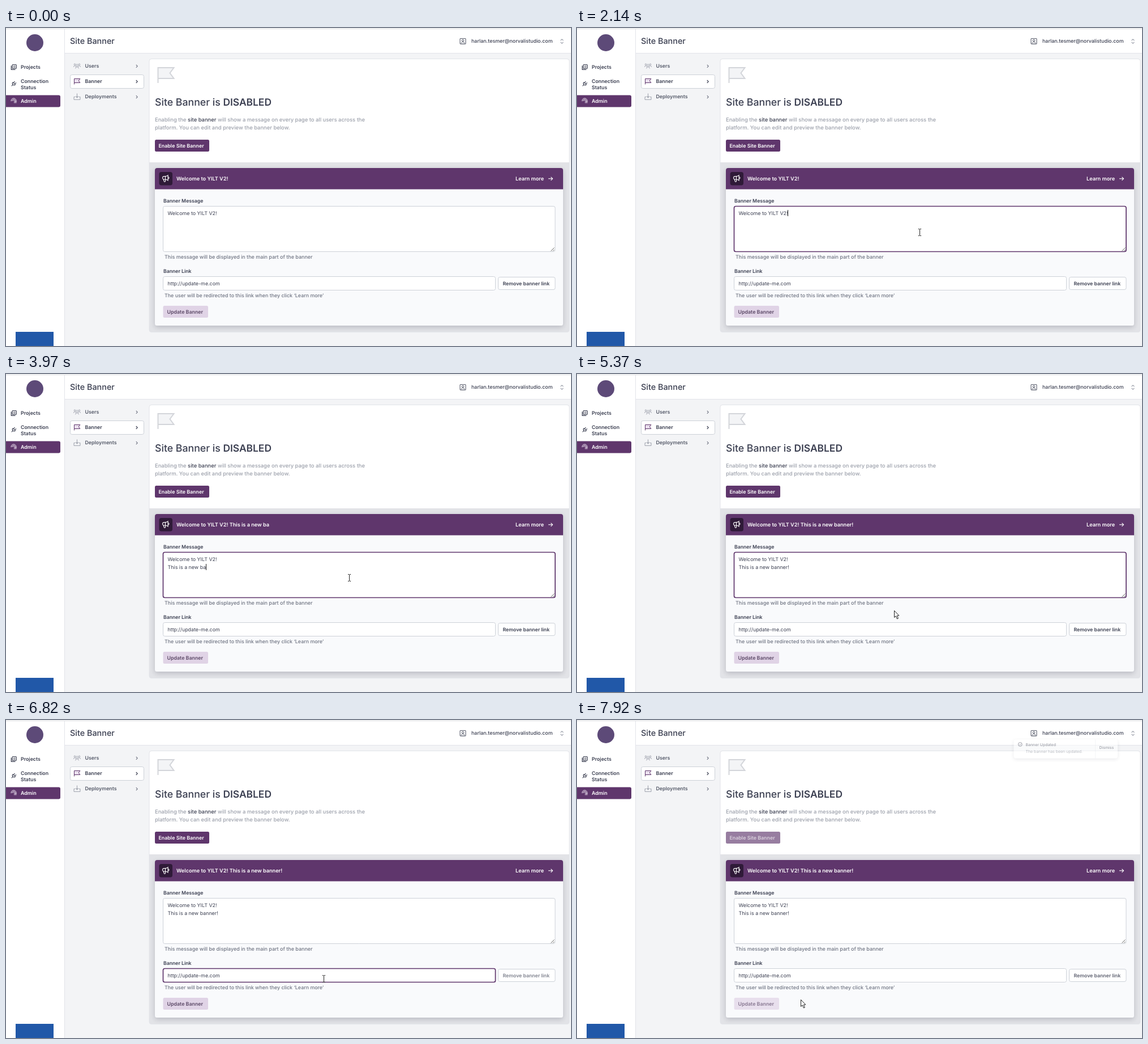
Animation, 998 px wide and 561 px high, one loop 7.99 s. Source, as an HTML page with a canvas:

```html
<!DOCTYPE html>
<html lang="en">
<head>
<meta charset="utf-8">
<title>Site Banner</title>
<style>
html, body { margin: 0; width: 100%; height: 100%; overflow: hidden; background: #f3f4f6; }
canvas { display: block; width: 998px; height: 561px; }
</style>
</head>
<body>
<canvas id="stage"></canvas>
<script>
const W = 998, H = 561, LOOP = 7990, BLINK = 530;
const canvas = document.getElementById('stage');
const ctx = canvas.getContext('2d');
const dpr = window.devicePixelRatio || 1;
canvas.width = W * dpr;
canvas.height = H * dpr;

const PURPLE = '#5f366c', INK = '#3b3f51', GREY = '#9ca0ab', MUTED = '#6f7482',
      BORDER = '#cdd1d8', RULE = '#e2e4e9';
const HELLO = 'Welcome to YILT V2!';
const LINK = 'http://update-me.com';
const NEWLINE = 2270, FOCUS_TEXT = 1080, FOCUS_LINK = 6290, BLUR = 7640, SAVED = 7780;

const BURSTS = [
  { start: 2530, pace: 105, str: 'This is' },
  { start: 3360, pace: 68, str: ' a new ' },
  { start: 3900, pace: 68, str: 'banner' },
  { start: 4580, pace: 68, str: '!' }
];

// The pointer eases from stop to stop.
const STOPS = [
  { t: 120, x: 893, y: 527 },
  { t: 940, x: 605, y: 360 },
  { t: 5110, x: 606, y: 359 },
  { t: 5370, x: 560, y: 417 },
  { t: 6200, x: 561, y: 456 },
  { t: 6820, x: 561, y: 456 },
  { t: 7570, x: 332, y: 500 },
  { t: 7920, x: 395, y: 493 }
];

const MEGAPHONE = new Path2D('M11 5.9V19.2a1.8 1.8 0 0 1-3.4.6l-2.2-6.1M18 13a3 3 0 1 0 0-6' +
  'M5.4 13.7A4 4 0 0 1 7 6h1.8c4.1 0 7.6-1.2 9.2-3v14c-1.6-1.8-5.1-3-9.2-3H7a4 4 0 0 1-1.6-.3z');

const clamp = v => Math.max(0, Math.min(1, v));
const ramp = (t, start, length) => clamp((t - start) / length);
const smooth = k => k * k * (3 - 2 * k);

function font(size, weight) {
  ctx.font = `${weight} ${size}px Inter, "Open Sans", sans-serif`;
}

// Returns the right end so that runs can be chained.
function text(str, x, y, color = INK, weight = 500, size = 8.8) {
  font(size, weight);
  ctx.fillStyle = color;
  ctx.fillText(str, x, y);
  return x + ctx.measureText(str).width;
}

function paint(fill, stroke, width = 1) {
  if (fill) { ctx.fillStyle = fill; ctx.fill(); }
  if (stroke) { ctx.strokeStyle = stroke; ctx.lineWidth = width; ctx.stroke(); }
}

function box(x, y, w, h, radius, fill, stroke, width) {
  ctx.beginPath();
  ctx.roundRect(x, y, w, h, radius);
  paint(fill, stroke, width);
}

function line(points, color, width, close = false, fill) {
  ctx.beginPath();
  points.forEach(([x, y]) => ctx.lineTo(x, y));
  if (close) ctx.closePath();
  paint(fill, color, width);
}

function arc(x, y, r, color, width, from = 0, to = 2, fill) {
  ctx.beginPath();
  ctx.arc(x, y, r, from * Math.PI, to * Math.PI);
  paint(fill, color, width);
}

function at(x, y, draw, scale = 1, turn = 0) {
  ctx.save();
  ctx.translate(x, y);
  ctx.rotate(turn * Math.PI);
  ctx.scale(scale, scale);
  draw();
  ctx.restore();
}

function faded(alpha, draw) {
  ctx.save();
  ctx.globalAlpha *= alpha;
  draw();
  ctx.restore();
}

// A panel whose shadow falls only outside its own edge.
function raised(x, y, w, h, fill, alpha, blur, dy) {
  ctx.save();
  ctx.beginPath();
  ctx.rect(0, 0, W, H);
  ctx.roundRect(x, y, w, h, 4);
  ctx.clip('evenodd');
  ctx.shadowColor = `rgba(30, 30, 50, ${alpha})`;
  ctx.shadowBlur = blur * dpr;
  ctx.shadowOffsetY = dy * dpr;
  box(x, y, w, h, 4, fill);
  ctx.restore();
  box(x, y, w, h, 4, fill);
}

function flag(x, y, k, color, width, fill) {
  at(x, y, () => line([[0, 27], [0, 0], [28, 0], [21, 9.5], [28, 19], [0, 19]],
    color, width / k, false, fill), k);
}

function chevron(x, y, color, turn = 0) {
  at(x, y, () => line([[-1.2, -2.5], [1.2, 0], [-1.2, 2.5]], color, 1.1), 1, turn);
}

function sidebar() {
  box(0, 2, 103, H, 0, '#fff');
  box(103, 2, 1, H, 0, RULE);
  arc(51, 26, 15, null, 0, 0, 2, '#5d4a78');

  box(11.2, 64.5, 7, 7, 1, null, INK, 1.2);
  line([[9.3, 66.5], [9.3, 73.4], [16.5, 73.4]], INK, 1.2);
  [67, 69.3].forEach(y => line([[13, y], [16.5, y]], INK));
  text('Projects', 26, 72, INK, 600);

  at(13.7, 98.5, () => {
    arc(0, -1, 3, INK, 1.1, 0, 1);
    line([[-3, -1], [3, -1]], INK, 1.1);
    [-1.6, 1.6].forEach(x => line([[x, -1], [x, -4.5]], INK, 1.1));
    line([[0, 2], [0, 5.5]], INK, 1.1);
  }, 1, 0.25);
  text('Connection', 26, 97, INK, 600);
  text('Status', 26, 108, INK, 600);

  box(0, 118.5, 96, 21, [0, 3, 3, 0], PURPLE);
  for (let r = 1.4; r < 5; r += 1.6) {
    arc(13.5, 128.5, r, '#e6dbea', 0.9, 0.95, 2.1);
    line([[13.5 + r, 128.5], [13.3 + r, 132.5]], '#e6dbea', 0.9);
  }
  text('Admin', 26, 132, '#fff', 600, 8.9);

  box(17, 536, 67, 67, 0, '#2158a8');
}

function header() {
  box(104, 2, W - 104, 42, 0, '#fff');
  box(104, 44, W - 104, 1, 0, RULE);
  box(0, 1, W, 1, 0, '#dcdde0');
  text('Site Banner', 113, 28, INK, 500, 14.4);
  box(802, 18.5, 10, 9.6, 1, null, '#5b5f6e', 1.1);
  arc(807, 22, 1.7, '#5b5f6e');
  arc(807, 28, 3.3, '#5b5f6e', 1, 1.1, 1.9);
  text('harlan.tesmer@norvalistudio.com', 822, 26, INK, 500, 8.9);
  chevron(982, 21, GREY, -0.5);
  chevron(982, 26, GREY, 0.5);
}

function person(x, y, k) {
  arc(x, y - 3 * k, 1.7 * k, GREY, 0.9);
  arc(x, y + 3 * k, 2.8 * k, GREY, 0.9, 1, 2);
}

function subnav() {
  box(113.5, 82.5, 130, 24, 3, '#fff', BORDER);
  ['Users', 'Banner', 'Deployments'].forEach((label, i) => {
    const y = 67 + i * 27.2, active = i === 1;
    text(label, 139.5, Math.round(y + 2.6), active ? INK : '#555a69', 600);
    chevron(231, y + 0.3, active ? INK : MUTED);
  });

  person(125.5, 68.5, 1);
  person(121.5, 66.5, 0.75);
  person(129.5, 66.5, 0.75);
  flag(120.5, 89.5, 0.37, PURPLE, 1, '#eadfee');
  line([[122, 121.5], [120, 121.5], [120, 126.3], [131, 126.3], [131, 121.5], [129, 121.5]], GREY);
  line([[125.5, 115.5], [125.5, 122.5]], GREY);
  chevron(125.5, 121.5, GREY, 0.5);
}

function intro(saving) {
  box(253, 54.5, 742, 482, 4, '#e2e3e7', RULE);
  box(253.5, 55, 741, 182, [4, 4, 0, 0], '#fff');
  flag(268.5, 70, 1, '#d3d5da', 2, '#f3f4f6');
  const x = text('Site Banner is ', 263, 137, INK, 500, 17.7);
  text('DISABLED', x, 137, INK, 600, 17.4);

  const a = text('Enabling the ', 263, 165, GREY, 500, 9.42);
  const b = text('site banner', a, 165, INK, 500, 9.42);
  text(' will show a message on every page to all users across the', b, 165, GREY, 500, 9.42);
  text('platform. You can edit and preview the banner below.', 263, 179, GREY, 500, 9.42);

  faded(1 - 0.5 * saving, () => {
    box(263, 197, 96, 21, 2.5, PURPLE);
    text('Enable Site Banner', 269.5, 210.5, '#fff', 600, 8.85);
  });
}

function preview(message) {
  raised(263, 247, 721, 278, '#f9fafc', 0.2, 8, 3);
  box(263, 247, 721, 37.5, [4, 4, 0, 0], PURPLE);
  box(270.5, 254, 23.5, 23.5, 4, '#2f1a38');
  at(274.5, 258, () => {
    ctx.strokeStyle = '#fff';
    ctx.lineWidth = 1.7;
    ctx.stroke(MEGAPHONE);
  }, 0.64);
  text(message, 301, 269, '#fff', 600, 9.15);
  text('Learn more', 900, 269, '#fff', 600, 9.15);
  line([[958, 265.8], [965.5, 265.8]], '#fff', 1.1);
  line([[962.5, 262.8], [965.5, 265.8], [962.5, 268.8]], '#fff', 1.1);
}

function field(x, y, w, h, focus) {
  box(x, y, w, h, 3, '#fff', BORDER);
  if (focus > 0) faded(focus, () => box(x, y, w, h, 3, null, PURPLE, 1.7));
}

function caret(str, y) {
  font(8.9, 400);
  box(Math.round(285.5 + ctx.measureText(str).width), y, 1, 11, 0, '#222');
}

function form(t, typed, pointer, saving) {
  text('Banner Message', 278, 308, INK, 600, 8.7);
  field(277.5, 314.5, 692.5, 80, ramp(t, FOCUS_TEXT, 200) - ramp(t, FOCUS_LINK, 200));
  text(HELLO, 285.5, 330, INK, 400, 8.9);
  text(typed, 285.5, 344, INK, 400, 8.9);
  [6, 2.5].forEach(d => line([[968.5 - d, 393.5], [968.5, 393.5 - d]], '#555', 0.9));
  text('This message will be displayed in the main part of the banner', 280, 407, MUTED, 500, 8.96);

  text('Banner Link', 278, 432, INK, 600, 8.7);
  field(277.5, 438.5, 587, 24, ramp(t, FOCUS_LINK, 200) - ramp(t, BLUR, 150));
  text(LINK, 285.5, 453.5, INK, 400, 8.9);
  text('The user will be redirected to this link when they click ‘Learn more’', 280, 475, MUTED, 500, 8.86);

  const checking = ramp(t, 6690, 100) - ramp(t, 6870, 120);
  box(869.5, 439.5, 100.5, 22, 3, '#fff', BORDER);
  faded(1 - 0.35 * checking - 0.25 * saving, () =>
    text('Remove banner link', 877.5, 453.5, INK, 600, 8.7));

  faded(1 - 0.45 * saving, () => {
    box(277.5, 490, 79.5, 21, 2.5, pointer.hand ? '#d6c5dd' : '#e0d3e6');
    text('Update Banner', 284.5, 503.5, '#5b4866', 600, 8.85);
  });
}

function typing(t) {
  let typed = '', lastKey = NEWLINE;
  for (const { start, pace, str } of BURSTS) {
    if (t < start) break;
    const count = Math.min(str.length, 1 + Math.floor((t - start) / pace));
    typed += str.slice(0, count);
    lastKey = start + (count - 1) * pace;
  }
  return { typed, lastKey };
}

function drawCaret(t, typed, lastKey) {
  if (t < FOCUS_TEXT || t >= BLUR) return;
  const since = t < NEWLINE ? FOCUS_TEXT : t < FOCUS_LINK ? lastKey : FOCUS_LINK;
  if (Math.floor((t - since) / BLINK) % 2) return;
  if (t < NEWLINE) caret(HELLO, 321);
  else if (t < FOCUS_LINK) caret(typed, 335);
  else caret(LINK, 445);
}

function toast(t) {
  faded(ramp(t, SAVED, 300), () => {
    raised(771.5, 34.5, 183.5, 33, '#fff', 0.2, 6, 2);
    arc(782.8, 43, 3.4, INK, 1);
    line([[781.2, 43], [782.5, 44.3], [784.6, 41.8]], INK, 0.9);
    text('Banner Updated', 792.5, 46, INK, 500, 6.9);
    text('The banner has been updated.', 792.5, 57.5, MUTED, 400, 6.95);
    box(915, 34.5, 0.8, 33, 0, RULE);
    text('Dismiss', 922.5, 51.3, INK, 500, 6.9);
  });
}

function pointerAt(t) {
  const i = STOPS.findLastIndex(s => s.t <= t);
  if (i < 0) return { x: -50, y: -50 };
  const a = STOPS[i], b = STOPS[i + 1] || { ...a, t: LOOP };
  const k = smooth(ramp(t, a.t, b.t - a.t));
  const x = a.x + (b.x - a.x) * k, y = a.y + (b.y - a.y) * k;
  const over = (l, top, r, bottom) => x > l && x < r && y > top && y < bottom;
  return {
    x, y,
    beam: over(277, 314, 970, 395) || over(277, 438, 865, 463),
    hand: over(277, 490, 357, 511)
  };
}

function drawPointer({ x, y, beam, hand }) {
  at(Math.round(x), Math.round(y), () => {
    if (beam) {
      line([[0.5, -5], [0.5, 6]], '#222');
      [-5.5, 6.5].forEach(end => [-2, 1].forEach(l => line([[l, end], [l + 2, end]], '#222')));
    } else if (hand) {
      line([[-1, 0], [1, 0], [1, 5], [7, 6], [7, 10], [5, 14], [-1, 14], [-5, 8], [-1, 9]],
        '#222', 1, true, '#fff');
    } else {
      line([[0.5, 0.5], [0.5, 12.5], [3.2, 10], [5.4, 15], [7.4, 14.1], [5.3, 9.3], [8.8, 9.2]],
        '#222', 1, true, '#fff');
    }
  });
}

function render(t) {
  const { typed, lastKey } = typing(t);
  const pointer = pointerAt(t);
  const saving = ramp(t, SAVED, 200);
  ctx.setTransform(dpr, 0, 0, dpr, 0, 0);
  ctx.textRendering = 'geometricPrecision';
  box(0, 0, W, H, 0, '#f3f4f6');
  box(0, 0, W, 2, 0, '#fff');
  sidebar();
  header();
  subnav();
  intro(saving);
  preview(`${HELLO} ${typed}`);
  form(t, typed, pointer, saving);
  drawCaret(t, typed, lastKey);
  toast(t);
  drawPointer(pointer);
}

const start = performance.now();
function tick() {
  render((performance.now() - start) % LOOP);
  requestAnimationFrame(tick);
}
tick();
</script>
</body>
</html>
```
